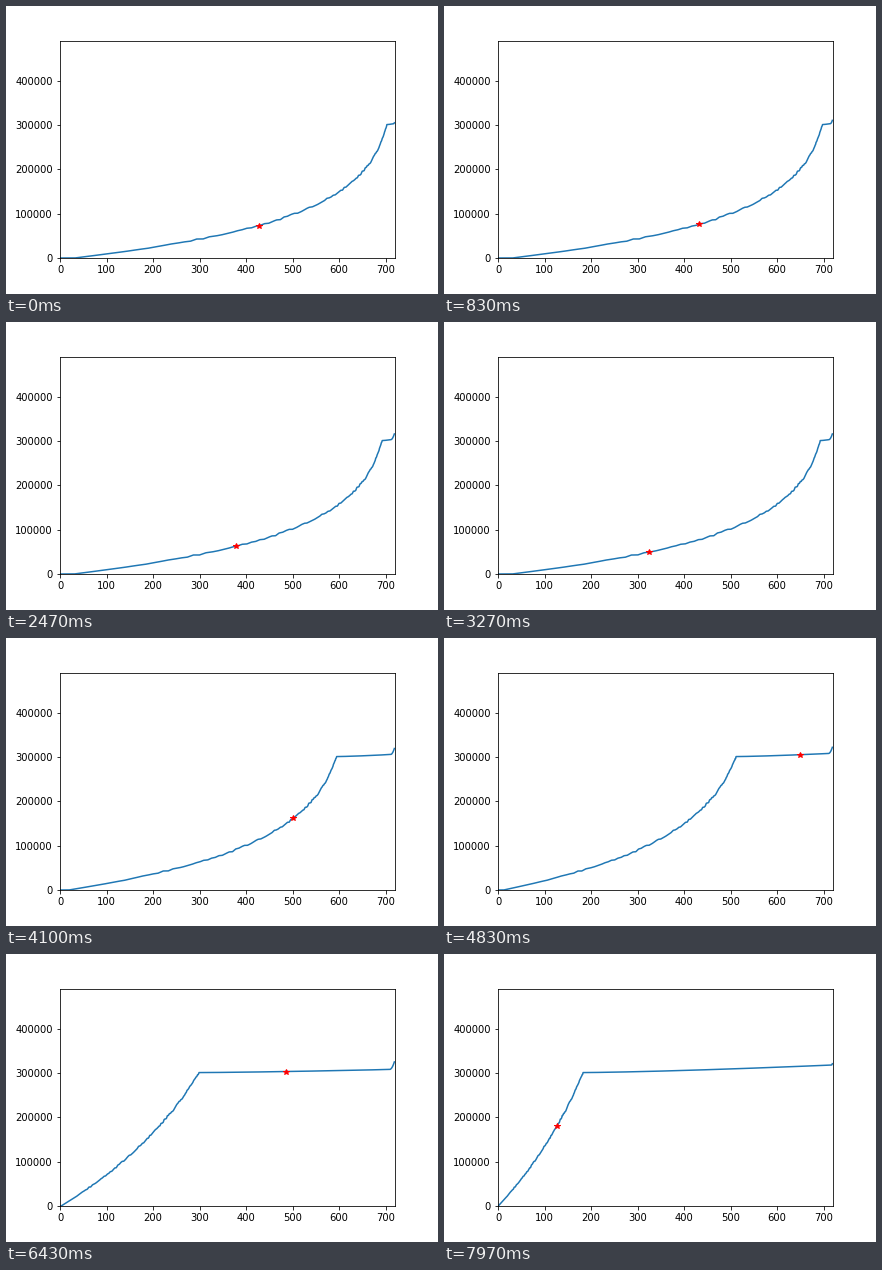
A matplotlib script for the animation above (8 s loop, 432x288 px).

```python
import numpy as np
import matplotlib.pyplot as plt
from matplotlib.animation import FuncAnimation

plt.rcParams["text.kerning_factor"] = 6

FRAMES, FPS, N = 240, 30, 720
CAP = 301  # level, in thousands, where the plateau begins
rank = np.arange(N)

# Key points: first rank on the plateau, and rank of the star.
keys = [0, 48, 98, 144, 168, 192, 239]
plateau_rank = [703, 692, 693, 512, 413, 299, 183]
star_rank = [428, 436, 325, 650, 450, 486, 127]

# Uneven steps that travel along with the curve.
rng = np.random.default_rng(4)
grid = np.linspace(0, CAP, 110)
rough = grid + rng.normal(0, 1.4, grid.size) * np.clip(grid / 90, 0, 1)
rough = np.sort(np.clip(rough, 0, CAP))
rough[-1] = CAP


def climb(start):
    """Ranks at which the curve reaches each grid level."""
    bend = 0.8 + 2.6 * max(0, (start - 290) / 400) ** 0.7
    idle = 0.045 * (start / 703) ** 2
    rise = (1 - np.exp(-bend * grid / CAP)) / (1 - np.exp(-bend))
    return start * (idle + (1 - idle) * rise)


def curve(frame):
    start = np.interp(frame, keys, plateau_rank)
    shelf = CAP + np.interp(frame, [98, 144, 192, 239], [2, 7, 7, 17])
    top = np.interp(frame, [0, 48, 98, 168, 225, 239],
                    [305, 316, 316, 325, 325, 321])
    end = N - 1 - 0.6 * (top - shelf)

    y = np.interp(rank, climb(start), rough)
    along = np.clip((rank - start) / (end - start), 0, 1)
    tail = np.clip((rank - end) / (N - 1 - end), 0, 1)
    y += (shelf - CAP) * along ** 1.4 + (top - shelf) * tail ** 2
    return 1000 * y


fig = plt.figure(figsize=(6, 4), dpi=72)
fig.subplots_adjust(left=0.125, right=0.9, bottom=0.125, top=0.88)
ax = fig.add_subplot()
ax.set_xlim(0, N)
ax.set_ylim(0, 490500)
line, = ax.plot([], [])
star, = ax.plot([], [], "r*")


def draw(frame):
    y = curve(frame)
    pos = int(round(np.interp(frame, keys, star_rank)))
    line.set_data(rank, y)
    star.set_data([pos], [y[pos]])
    return line, star


anim = FuncAnimation(fig, draw, frames=FRAMES, interval=1000 / FPS,
                     repeat=True, repeat_delay=0)
plt.show()
```
